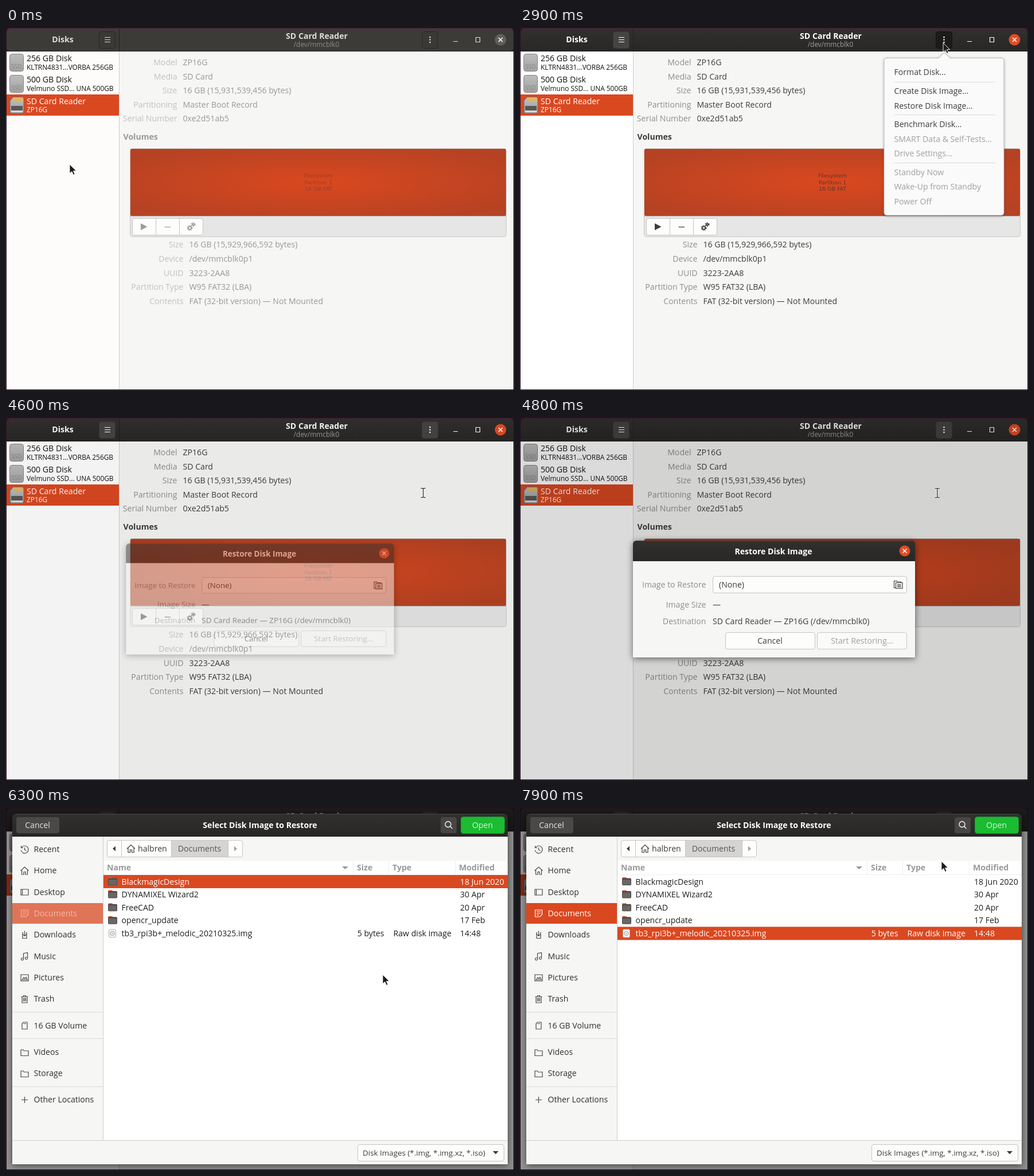
An HTML page for the animation above (8 s loop, 886 px wide and 632 px high).

```html
<!DOCTYPE html>
<html lang="en">
<head>
<meta charset="utf-8">
<title>Restore a disk image</title>
<style>
html, body { margin: 0; width: 100%; height: 100%; overflow: hidden; background: #2c1026; }
svg { display: block; width: 886px; height: 632px; }
text { font: 14.1px "Open Sans", "Noto Sans", sans-serif; white-space: pre; }
.b { font-weight: 700; }
.s { font-size: 11.9px; }
.v { font: 9.5px "DejaVu Sans", sans-serif; }
.e { text-anchor: end; }
.m { text-anchor: middle; }
.win { filter: drop-shadow(0 2px 6px rgba(0, 0, 0, .55)); }
</style>
</head>
<body>
<svg id="stage" viewBox="0 0 886 632">
  <defs>
    <radialGradient id="vol" r=".62">
      <stop offset="0" stop-color="#da481f"/><stop offset="1" stop-color="#b54223"/>
    </radialGradient>
    <linearGradient id="bar" x2="0" y2="1">
      <stop offset="0" stop-color="#32302f"/><stop offset="1" stop-color="#282725"/>
    </linearGradient>
    <linearGradient id="metal" x2="0" y2="1">
      <stop offset="0" stop-color="#bdbdbd"/><stop offset="1" stop-color="#a2a2a2"/>
    </linearGradient>
  </defs>
</svg>
<script>
const ORANGE = '#da4820', INK = '#3d3d3d', DIM = '#8e8e8d', PAPER = '#f6f6f4', EDGE = '#c6c5c3';

// Drawing helpers: each returns SVG markup.
const text = (s, x, y, cls = '', fill = INK) =>
  `<text x="${x}" y="${y}" class="${cls}"${fill && ` fill="${fill}"`}>${s}</text>`;
const rect = (x, y, w, h, fill, more = '') =>
  `<rect x="${x}" y="${y}" width="${w}" height="${h}" fill="${fill}" ${more}/>`;
const box = (x, y, w, h, fill, stroke = EDGE, r = 3.5, more = '') =>
  rect(x + .5, y + .5, w - 1, h - 1, fill, `stroke="${stroke}" rx="${r}" ${more}`);
const path = (d, fill, stroke = 'none', w = 1, more = '') =>
  `<path d="${d}" fill="${fill}" stroke="${stroke}" stroke-width="${w}" ${more}/>`;
const line = (d, stroke = '#dbdad8', w = 1) => path(d, 'none', stroke, w);
const group = (id, body, more = '') => `<g id="${id}" ${more}>${body}</g>`;
const icon = (x, y, d, stroke = '#474747') =>
  `<g transform="translate(${x} ${y})">${line(d, stroke, 1.2)}</g>`;
const closeButton = (x, y, r, fill, id = '') =>
  `<circle id="${id}" cx="${x}" cy="${y}" r="${r}" fill="${fill}"/>` +
  line(`M${x - 3.5} ${y - 3.5}l7 7m0 -7l-7 7`, '#fff', 1.6);
const header = (x, y, w, h) =>
  path(`M${x} ${y + h}V${y + 7}q0 -7 7 -7H${x + w - 7}q7 0 7 7V${y + h}Z`, 'url(#bar)');
const list = (rows, lx, vx) => rows.map(([label, value, y]) =>
  text(label, lx, y, 'e', DIM) + text(value, vx, y)).join('');

function ssd(y, name, model) {
  return box(6, y + 4, 25, 31, 'url(#metal)', '#828282', 4) +
    `<text x="18.5" y="${y + 30}" class="m" fill="#858585" style="font-size:10px">SSD</text>` +
    text(name, 36, y + 17, '', '#111') + text(model, 36, y + 32, 's', '#111');
}

function gear(x, y, r) {
  return `<circle cx="${x}" cy="${y}" r="${r}" fill="none" stroke="${INK}" stroke-width="1.8"/>` +
    `<circle cx="${x}" cy="${y}" r="${r + 1.6}" fill="none" stroke="${INK}" stroke-width="1.6" stroke-dasharray="1.6 1.9"/>`;
}

function mainWindow() {
  const card = path('M12.5 120.5H28q3 0 3 3V146q0 3 -3 3H10q-3 0 -3 -3V127Z', 'url(#metal)', '#6b6b6b') +
    line('M14.5 122v7m3.5 -7v7m3.5 -7v7m3.5 -7v7m3 -7v7', '#e3b65c', 2) +
    rect(9, 136, 20, 8, '#585858', 'rx="1"') + rect(9, 144, 20, 3, '#d8d8d8');
  const info = list([
    ['Model', 'ZP16G', 65], ['Media', 'SD Card', 89.5],
    ['Size', '16 GB (15,931,539,456 bytes)', 114],
    ['Partitioning', 'Master Boot Record', 138.5], ['Serial Number', '0xe2d51ab5', 163]], 298.5, 308.5) +
    text('Volumes', 204.5, 195, 'b') +
    list([
      ['Size', '16 GB (15,929,966,592 bytes)', 383], ['Device', '/dev/mmcblk0p1', 408],
      ['UUID', '3223-2AA8', 432.5], ['Partition Type', 'W95 FAT32 (LBA)', 457],
      ['Contents', 'FAT (32-bit version) — Not Mounted', 481.5]], 309.5, 319.5) +
    ['Filesystem', 'Partition 1', '16 GB FAT'].map((s, i) =>
      text(s, 545, 261 + i * 11.7, 'v m', '#62352a')).join('') +
    path('M235 341l11.5 6 -11.5 6Z', INK) + line('M276.5 347.5h10.5', INK, 1.2) +
    gear(320.5, 349, 2.6) + gear(326.5, 343, 1.6);
  return rect(0, 0, 886, 632, '#2c1026') + rect(0, 0, 886, 1, '#4b1a35') +
    rect(1, 41, 197, 590, '#fff') + rect(198, 41, 687, 590, PAPER) +
    group('side', rect(1, 41, 196, 590, '#fdfcfa')) + rect(197, 41, 1, 590, '#d0cfcd') +
    ssd(41, '256 GB Disk', 'KLTRN4831…VORBA 256GB') + ssd(78, '500 GB Disk', 'Velmuno SSD… UNA 500GB') +
    rect(1, 116, 196, 37, ORANGE) + card +
    text('SD Card Reader', 36, 132.5, '', '#fff') + text('ZP16G', 36, 147, 's', '#fff') +
    box(216, 210, 657, 155, '#e6e6e6', '#c9c8c6', 4) +
    rect(217, 211, 655, 117, 'url(#vol)', 'rx="2"') + line('M217 328.5H872', '#bbb5b2') +
    box(220, 332, 124, 30, '#fdfdfc') + line('M261.5 333v28M302.5 333v28', EDGE) +
    group('info', info) +
    header(1, 1, 884, 40) + group('idleBar', rect(1, 1, 884, 39, '#3c3b38', 'rx="6"')) +
    rect(1, 40, 884, 1, '#1f1e1c') + rect(197, 1, 1, 39, '#232220') +
    box(162, 6, 29, 30, '#454442', '#3a3937', 4, 'class="tool"') +
    box(725, 6, 29, 30, '#454442', '#3a3937', 4, 'class="tool" id="kebab"') +
    group('barText', text('Disks', 99, 25, 'b m', '#fff') + text('SD Card Reader', 542, 18.5, 'b m', '#fff') +
      text('/dev/mmcblk0', 541.5, 33, 's m', '#a19f9c') +
      line('M172 16.5h10m-10 4h10m-10 4h10', '#fff', 1.2) +
      [16, 20.5, 25].map(y => `<circle cx="739.5" cy="${y}" r="1.3" fill="#fff"/>`).join('') +
      line('M780 23.5h8M819.5 16.5h7v8h-7Z', '#fff', 1.2)) +
    closeButton(862.5, 20.5, 10, '#e04c25', 'close');
}

const menu = [['Format Disk…', 77], ['Create Disk Image…', 110], ['Restore Disk Image…', 135.5],
  ['Benchmark Disk…', 168], ['SMART Data &amp; Self-Tests…', 193.5], ['Drive Settings…', 219],
  ['Standby Now', 251.5], ['Wake-Up from Standby', 277], ['Power Off', 302.5]];

function popover() {
  return path('M640 52.5H730L740 43l10 9.5H839q5 0 5 5V322q0 5 -5 5H640q-5 0 -5 -5V57.5q0 -5 5 -5Z',
    '#fafafa', '#bdbcba', 1, 'style="filter:drop-shadow(0 1px 2px rgba(0,0,0,.3))"') +
    rect(647, 0, 185, 26, '#dcdcdb', 'rx="4" id="hover"') +
    line('M652 94.5h177M652 151.5h177M652 235.5h177') +
    menu.map(([s, y], i) => text(s, 652.5, y + 5, '', i < 4 ? INK : '#a0a09f')).join('');
}

function dialog() {
  return `<g class="win">${header(197, 214, 492, 37)}${rect(197, 250, 492, 168, PAPER)}</g>` +
    line('M204 214.5h478', '#484644') + text('Restore Disk Image', 442, 238, 'b m', '#fff') +
    closeButton(671, 232, 9.5, '#e04c25') +
    list([['Image Size', '—', 331], ['Destination', 'SD Card Reader — ZP16G (/dev/mmcblk0)', 360]], 324.5, 336) +
    text('Image to Restore', 324.5, 296, 'e', DIM) +
    box(336, 276, 339, 30, '#fdfdfc', EDGE, 3.5, 'id="entry"') + text('(None)', 347, 296) +
    line('M655.5 296.5h-3v-12h5l1 1.5h6v2M655.5 287.5h11.5v10h-11.5ZM658 290.5h6.5m-6.5 2.2h6.5m-6.5 2.2h6.5', INK, 1.2) +
    box(358, 374, 157, 30, '#fdfdfc') + text('Cancel', 436, 394, 'm') +
    box(518, 374, 157, 30, '#fafaf9') + text('Start Restoring…', 596.5, 394, 'm', '#a0a09f');
}

const files = [['BlackmagicDesign', '18 Jun 2020'], ['DYNAMIXEL Wizard2', '30 Apr'], ['FreeCAD', '20 Apr'],
  ['opencr_update', '17 Feb'], ['tb3_rpi3b+_melodic_20210325.img', '14:48']];

function fileRow([name, date], i) {
  const y = 117 + i * 22.6, isFile = i == 4;
  const pic = isFile
    ? box(179, y + 4, 13, 15, '#f4f4f3', '#b5b5b4', 2) +
      `<circle cx="185.5" cy="${y + 11.5}" r="3.6" fill="none" stroke="#9a9a9a"/><circle cx="185.5" cy="${y + 11.5}" r="1" fill="#9a9a9a"/>`
    : rect(178, y + 4, 8, 4, '#e0603c', 'rx="1.5"') + rect(178, y + 5.5, 16, 12.5, '#4c4a49', 'rx="2"') +
      rect(179, y + 8, 14, 9, '#696665', 'rx="1"');
  return `<g class="file">${rect(170, y, 705, 23, ORANGE)}${pic}${text(name, 201.5, y + 16.5, '', '')}` +
    (isFile ? text('5 bytes', 659.5, y + 16.5, 'e', '') + text('Raw disk image', 675.5, y + 16.5, '', '') : '') +
    text(date, 792, y + 16.5, '', '') + '</g>';
}

function chooser() {
  const home = 'M1 8L8 1.5 15 8M3 7v7.5h3.5V10h3v4.5H13V7';
  const folder = 'M1.5 3.5h4l1.5 2h7.500v8.500h-13Z';
  const places = [
    ['Recent', 72, 'M3 4a6.500 6.500 0 1 1 -1.300 5M2 1.500V5h3.500M8 4.500V8.500l3 1.500'],
    ['Home', 109, home],
    ['Desktop', 146.5, 'M1.500 3h13v10h-13ZM4 3v10'],
    ['Downloads', 221, 'M8 1v9M5 7l3 3 3 -3M5.500 4H4.500v10h7V4h-1'],
    ['Music', 258.5, 'M6 12.500V3l7 -1.500V11M6 12.500a2 2 0 1 1 -1 -1.500M13 11a2 2 0 1 1 -1 -1.500'],
    ['Pictures', 296, 'M1.500 2.500h13v11h-13ZM3.500 11.500l3 -4 2 2 2 -2.500 2 4.500Z'],
    ['Trash', 333, 'M2 4h12M6 4V2h4v2M3.500 4v10.500h9V4M6 6v6m2 -6v6m2 -6v6'],
    ['16 GB Volume', 379.5, 'M6 2h6.500v12h-9V4.500ZM6 4.500h4.500'],
    ['Videos', 426, folder], ['Storage', 463, folder],
    ['Other Locations', 509, 'M8 2.500v11M2.500 8h11']];
  return `<g class="win">${header(11, 10, 864, 40)}${rect(11, 50, 864, 572, PAPER)}</g>` +
    line('M18 10.500h850', '#484644') + rect(11, 49, 864, 1, '#1f1e1c') +
    rect(18, 16, 75, 28, '#4a4947', 'rx="4"') + text('Cancel', 55, 34.5, 'm', '#e6e5e3') +
    text('Select Disk Image to Restore', 443, 34.500, 'b m', '#fff') +
    rect(758, 16, 28, 28, '#474644', 'rx="4"') +
    '<circle cx="771" cy="28.500" r="5" fill="none" stroke="#fff" stroke-width="1.300"/>' + line('M774.500 32l4 4', '#fff', 1.300) +
    box(793, 15, 77, 30, '#1bbc31', '#149627', 4) + text('Open', 831, 34.5, 'm', '#d2f3d6') +
    rect(170, 92, 705, 488, '#fff') + line('M169.5 50V580M11 580.5H875', '#cfcecc') +
    line('M605.5 92v25M667.5 92v25M783.5 92v25M170 116.5H875', '#efeeed') +
    places.map(([s, y, d]) => icon(24.5, y - 7.5, d) + text(s, 48.5, y + 5, '', '#2f2f2f')).join('') +
    line('M11 356.5h158M11 402.5h158M11 486.5h158') +
    group('docs', rect(11, 166, 158, 36, ORANGE)) +
    group('docsText', icon(24.5, 176, 'M2 2h12v8l-4 4H2ZM4.5 5h7m-7 3h7m-7 3h4', '#fff') + text('Documents', 48.5, 189, '', '#fff')) +
    box(176, 56, 237, 30, '#fdfdfc') + rect(289, 57, 98, 28, '#d5d4d2') +
    line('M201.5 57v28M288.5 57v28M387.5 57v28', EDGE) +
    path('M191 66.500v9l-5 -4.500Z', INK) + path('M398 66.500v9l5 -4.500Z', '#a2a2a1') +
    icon(210, 63, home, INK) + text('halbren', 230, 76) + text('Documents', 337.5, 76, 'm', '#555') +
    [['Name', 176], ['Size', 612], ['Type', 674], ['Modified', 790]].map(([s, x]) =>
      text(s, x, 109, 'b', '#999')).join('') +
    path('M586 102h11l-5.500 5Z', '#999') + files.map(fileRow).join('') +
    box(613, 587, 256, 30, '#fdfdfc') +
    `<g style="--k:0">${text('Disk Images (*.img, *.img.xz, *.iso)', 622, 606.5).replace('<text', '<text style="font-size:13.4px"')}</g>` +
    path('M849 599h10l-5 5.500Z', INK);
}

const stage = document.getElementById('stage');
stage.innerHTML += group('main', mainWindow()) + group('pop', popover()) +
  rect(0, 0, 886, 632, '#000', 'id="shade"') + group('dlg', dialog()) + group('pick', chooser()) +
  group('arrow', path('M0 0V16l3.800 -3.500L6.500 18.500l2.600 -1.200L6.500 11.500h5Z', '#1c1c1c', '#fff', .9)) +
  group('beam', line('M-4 -8h3l1 1 1 -1h3M-4 8h3l1 -1 1 1h3M0 -7V7', '#fff', 2.600) +
    line('M-4 -8h3l1 1 1 -1h3M-4 8h3l1 -1 1 1h3M0 -7V7', '#222', 1.200));

const $ = id => document.getElementById(id);
const show = (id, a) => { $(id).style.display = a > 0 ? '' : 'none'; $(id).setAttribute('opacity', a); };
const pointer = [[200, 111, 238], [1000, 120, 461], [1400, 120, 461], [1500, 330, 300], [1600, 461, 138],
  [1700, 461, 138], [1800, 693, 84], [1900, 738, 46], [2000, 747, 37], [2100, 747, 37], [2600, 738, 26],
  [3200, 738, 26], [4000, 727, 130], [4900, 728, 131], [5300, 650, 250], [5500, 622, 299], [6000, 657, 291],
  [6500, 657, 291], [7000, 390, 236], [7100, 390, 236], [7400, 392, 224], [7600, 392, 224], [7900, 735, 93]];
const shade = [[4500, 0], [4800, .14], [5200, .31], [6200, .31], [6300, .42]];

// Value of a keyframe track at time t, column c.
function at(track, t, c = 1) {
  const i = track.findIndex(k => k[0] > t);
  if (i < 1) return (i ? track.at(-1) : track[0])[c];
  const a = track[i - 1], b = track[i];
  return a[c] + (b[c] - a[c]) * (t - a[0]) / (b[0] - a[0]);
}

function draw(t) {
  const x = at(pointer, t), y = at(pointer, t, 2);
  const focus = at([[300, 0], [600, 1]], t);

  show('side', 1 - focus);
  show('idleBar', 1 - focus);
  show('info', .5 + focus / 2);
  show('barText', .82 + focus * .18);
  $('close').setAttribute('fill', focus < .5 ? '#605f5b' : '#e04c25');
  document.querySelectorAll('.tool').forEach(b => {
    b.setAttribute('fill', focus < .5 ? '#3a3936' : '#454442');
    b.setAttribute('stroke', focus < .5 ? '#282724' : '#3a3937');
  });
  if (t >= 2200 && t < 4600) {
    $('kebab').setAttribute('fill', t < 2500 ? '#504f4d' : '#1c1b1a');
    $('kebab').setAttribute('stroke', '#121211');
  }

  show('pop', at([[2700, 0], [2900, 1], [4400, 1], [4600, 0]], t));
  const item = menu.find(m => Math.abs(m[1] - y) < 13);
  show('hover', item && t > 3200 ? 1 : 0);
  if (item) $('hover').setAttribute('y', item[1] - 13);

  show('shade', at(shade, t));
  const grow = at([[4500, 0], [4700, 1]], t);
  show('dlg', t < 6300 ? grow : 0);
  $('dlg').setAttribute('transform', `translate(443 316) scale(${.9 + grow * .1}) translate(-443 -316)`);
  $('entry').setAttribute('fill', t >= 6100 ? '#dcdbd9' : '#fdfdfc');

  show('pick', t >= 6300 ? 1 : 0);
  show('docs', t < 6400 ? .74 : 1);
  show('docsText', t < 6400 ? .5 : 1);
  const picked = t < 7300 ? 0 : 4;
  document.querySelectorAll('.file').forEach((row, i) => {
    row.setAttribute('fill', i == picked ? '#fff' : '#1e1e1e');
    row.firstChild.setAttribute('opacity', i == picked ? 1 : 0);
  });

  const typing = t >= 1600 && t <= 1800 || t >= 4600 && t <= 4900;
  show('arrow', typing ? 0 : 1);
  show('beam', typing ? 1 : 0);
  $(typing ? 'beam' : 'arrow').setAttribute('transform', `translate(${x} ${y})`);
}

const start = performance.now();
function tick() {
  draw(Math.floor((performance.now() - start) % 8000 / 100) * 100);
  requestAnimationFrame(tick);
}
tick();
</script>
</body>
</html>
```
